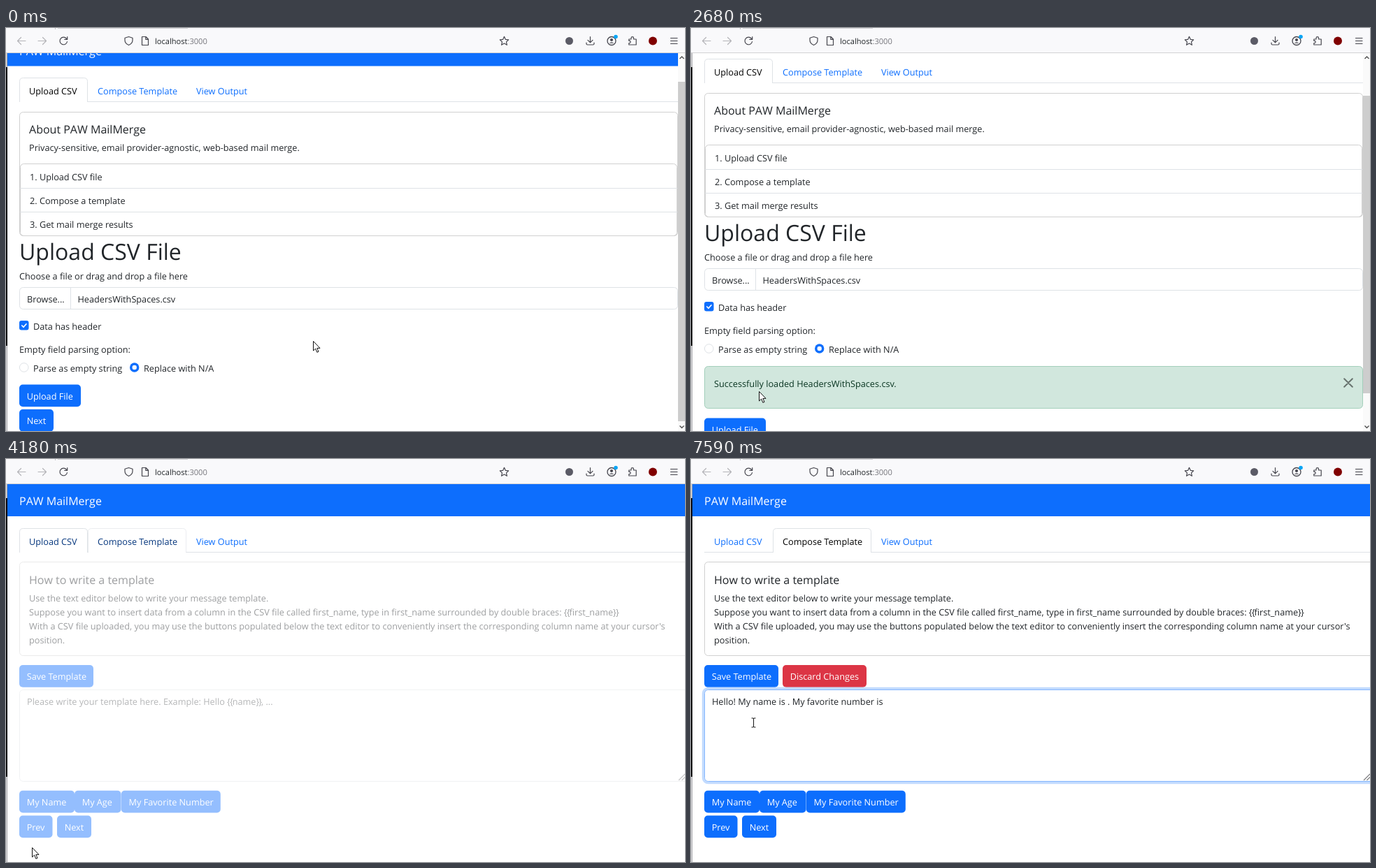
An HTML page for the animation above (8000 ms loop, 971 by 577 pixels).

```html
<!DOCTYPE html>
<html lang="en">
<head>
<meta charset="utf-8">
<title>Mail merge demo</title>
<style>
  html, body { margin: 0; width: 100%; height: 100%; overflow: hidden; background: #fff; }
  svg { display: block; width: 971px; height: 577px; }
  text { font: 12.7px "Open Sans", "Noto Sans", sans-serif; fill: #212529; text-rendering: geometricPrecision; white-space: pre; }
  .title { font-size: 16px; font-kerning: none; }
  .head { font-size: 32px; }
  .url { font-size: 11.1px; }
  .brace { letter-spacing: -.08em; }
  .light { fill: #fff; }
  .link { fill: #0d6efd; }
  .black { fill: #000; }
  .hint { fill: #595c5f; }
  .alert { fill: #0a3622; }
  .line { fill: none; stroke: #dee2e6; }
  .card { fill: none; stroke: #d0d0d0; }
  .icon { fill: none; stroke: #45454d; stroke-width: 1.2; stroke-linejoin: round; stroke-linecap: round; }
  .dim { stroke: #b4b4b8; }
</style>
</head>
<body>
<svg id="stage" viewBox="0 0 971 577" xmlns="http://www.w3.org/2000/svg"></svg>
<script>
const LOOP = 8000;
const BLUE = '#0d6efd', HOVER = '#0b5ed7';

const text = (x, y, s, cls = '', id = '') => `<text x="${x}" y="${y}" class="${cls}" id="${id}">${s}</text>`;
const rect = (x, y, w, h, fill, r = 0, more = '') =>
  `<rect x="${x}" y="${y}" width="${w}" height="${h}" rx="${r}" fill="${fill}" ${more}/>`;
const frame = (x, y, w, h, cls = 'line') => `<rect x="${x}" y="${y}" width="${w}" height="${h}" rx="5" class="${cls}"/>`;
const path = (d, cls = 'line', more = '') => `<path d="${d}" class="${cls}" ${more}/>`;
const circle = (x, y, r, fill, more = '') => `<circle cx="${x}" cy="${y}" r="${r}" fill="${fill}" ${more}/>`;
const group = (id, body, more = '') => `<g id="${id}" ${more}>${body}</g>`;
const braces = s => s.replace(/\{\{|\}\}/g, '<tspan class="brace">$&</tspan>');
const button = (x, y, w, label, id = '', fill = BLUE) =>
  rect(x, y, w, 31.7, fill, 5, `id="${id}"`) + text(x + 10.7, y + 21.3, label, 'light');
const tab = (x, y, w, id = '') =>
  path(`M${x} ${y + 34.5}V${y + 5}q0 -5 5 -5h${w - 10}q5 0 5 5v29.5`, 'line', `id="${id}" style="fill:#fff"`);

function browser() {
  const icons = [
    ['M28 18.5H17M21.5 13.5L16.5 18.5L21.5 23.5', 'icon dim'],
    ['M46 18.5H57M52.5 13.5L57.5 18.5L52.5 23.5', 'icon dim'],
    ['M86.5 15.2A5.3 5.3 0 1 0 87.5 19.5M87.7 12.5V16.3H83.8'],
    ['M175.5 12.5L181 14.3V17.5Q181 22 175.5 24.5Q170 22 170 17.5V14.3Z'],
    ['M194.5 12.5H200L203.5 16V24.5H194.5ZM199.8 12.7V16.3H203.3'],
    ['M712.5 12.3L714.4 16.4L718.7 16.9L715.5 19.9L716.4 24.3L712.5 22.1L708.6 24.3L709.5 19.9L706.3 16.9L710.6 16.4Z'],
    ['M835.5 12.5V20.5M832 17.3L835.5 20.8L839 17.3M830 21V22.5Q830 24 831.5 24H839.5Q841 24 841 22.5V21'],
    ['M890.8 16H894V14.5A1.7 1.7 0 0 1 897.6 14.5V16H901.2V24H890.8V21.5H892A1.7 1.7 0 0 0 892 18.3H890.8Z'],
    ['M950.5 14.5H960M950.5 18.5H960M950.5 22.5H960']
  ];
  return rect(0, 0, 971, 36, '#f9f9fb') +
    rect(74, 0, 186, 1, '#d2d2d6') + rect(70, 0, 1, 2, '#c4c4c8') +
    rect(0, 35, 971, 1, '#d2d2d4') +
    icons.map(([d, cls = 'icon']) => path(d, cls)).join('') +
    text(213, 23, 'localhost<tspan fill="#77777d">:3000</tspan>', 'url') +
    circle(805.5, 18.5, 5.5, '#5b5b66') +
    circle(866, 18.5, 6, 'none', 'stroke="#45454d" stroke-width="1.3"') +
    circle(866, 17, 2.1, '#45454d') + path('M862.6 21.8Q866 18.8 869.4 21.8Z', '', 'fill="#45454d"') +
    circle(872, 12.5, 2.8, '#0aa5f5') +
    circle(925, 18.5, 6, '#800000');
}

function desktopEdge() {
  return rect(0, 0, 2, 577, '#e4e4e6') + rect(1, 36, 1, 541, '#a4a4a7') +
    rect(0, 56, 2, 399, '#0b0b0d');
}

function uploadPage() {
  const steps = ['1. Upload CSV file', '2. Compose a template', '3. Get mail merge results'];
  return rect(2, 8, 959, 46.5, BLUE) + text(19, 39, 'PAW MailMerge', 'light title') +
    path('M19 105.5H961') + tab(19.5, 71.5, 97) +
    text(33, 95, 'Upload CSV', 'black') + text(131, 95, 'Compose Template', 'link') + text(272, 95, 'View Output', 'link') +
    frame(19.5, 120.5, 941, 177, 'card') +
    text(33, 151, 'About PAW MailMerge', 'title') +
    text(33, 176, 'Privacy-sensitive, email provider-agnostic, web-based mail merge.') +
    frame(20.5, 194.5, 939, 103, 'card') + path('M20 229.5H960M20 263.5H960') +
    steps.map((s, i) => text(34, 218 + 34.2 * i, s)).join('') +
    text(19, 332, 'Upload CSV File', 'head') +
    text(19, 360, 'Choose a file or drag and drop a file here') +
    frame(19.5, 371.5, 941, 31) + path('M92.5 372V402') +
    text(30, 392.5, 'Browse...') + text(102.5, 392.5, 'HeadersWithSpaces.csv') +
    rect(19, 419, 13.5, 13.5, BLUE, 3) +
    path('M22.8 426L25 428.2L29 423.8', '', 'fill="none" stroke="#fff" stroke-width="1.7" stroke-linecap="round"') +
    text(39, 431.5, 'Data has header') +
    text(19, 465, 'Empty field parsing option:') +
    circle(25.7, 486, 6.3, '#fff', 'stroke="#dee2e6"') + text(39, 491.5, 'Parse as empty string') +
    circle(183.7, 486, 6.7, BLUE) + circle(183.7, 486, 3.2, '#fff') + text(197, 491.5, 'Replace with N/A') +
    group('alert', frame(19.5, 511.5, 941, 60, 'box') +
      text(33, 541, 'Successfully loaded HeadersWithSpaces.csv.', 'alert') +
      path('M934.2 529.2L945.8 540.8M945.8 529.2L934.2 540.8', '', 'stroke="#68736e" stroke-width="2" stroke-linecap="round"')) +
    group('actions', button(19, 510.5, 88, 'Upload File', 'upload') + button(19, 546, 49, 'Next', 'next'));
}

function scrollbar() {
  return rect(961, 36, 10, 541, '#fafafa') + rect(961, 0, 10, 0, '#cdcdcd', 0, 'id="thumb"') +
    path('M963.5 44L966.5 41L969.5 44M963.5 569.5L966.5 572.5L969.5 569.5', '', 'fill="none" stroke="#505050" stroke-width="1.4"');
}

function composePage() {
  const help = [
    'Use the text editor below to write your message template.',
    'Suppose you want to insert data from a column in the CSV file called first_name, type in first_name surrounded by double braces: {{first_name}}',
    'With a CSV file uploaded, you may use the buttons populated below the text editor to conveniently insert the corresponding column name at your cursor\'s',
    'position.'
  ];
  return rect(2, 36, 969, 541, '#fff') + rect(2, 36, 969, 46, BLUE) +
    text(19, 66, 'PAW MailMerge', 'light title') +
    path('M19 133.5H971') + tab(19.5, 99.5, 97, 'oldTab') + tab(117.5, 99.5, 140, 'newTab') +
    text(33, 122.5, 'Upload CSV', '', 'oldLabel') + text(131, 122.5, 'Compose Template', '', 'newLabel') +
    text(272, 122.5, 'View Output', 'link') +
    group('editor', frame(19.5, 147.5, 970, 134, 'card') +
      text(33, 178.5, 'How to write a template', 'title') +
      help.map((s, i) => text(33, 204 + 20 * i, braces(s))).join('') +
      button(19, 295, 106, 'Save Template') +
      group('discard', button(131, 295, 120, 'Discard Changes', '', '#dc3545')) +
      group('ring', rect(17.5, 328.5, 980, 135, 'none', 7, 'stroke="#c2dbfe" stroke-width="3.4"')) +
      rect(19.5, 330.5, 976, 131, '#fff', 5, 'id="area"') +
      path('M962 460L971 451M966.5 460L971 455.5', '', 'stroke="#77777a" stroke-width="1.1"') +
      text(30, 352, braces('Please write your template here. Example: Hello {{name}}, ...'), 'hint', 'hint') +
      text(30, 352, 'Hello! My name is . My favorite number is', '', 'typed') +
      rect(30, 337, 1, 18, '#212529', 0, 'id="caret"') +
      button(19, 474.7, 79, 'My Name') + button(98, 474.7, 66.5, 'My Age') + button(164.8, 474.7, 142, 'My Favorite Number') +
      button(19, 510.5, 47.5, 'Prev') + button(73, 510.5, 49, 'Next'));
}

function pointers() {
  const fill = 'fill="#fff" stroke="#111" stroke-linejoin="round"';
  return group('arrow', path('M.5 .5V14L3.6 11.1L5.8 16.3L8 15.4L5.8 10.4H10Z', '', fill)) +
    group('hand', path('M-1.4 2a1.4 1.4 0 0 1 2.8 0V6.3L5.7 7.2Q7.8 7.8 7.7 9.6V12Q7.6 14.5 6.5 16V18.5H-.8V17Q-3 14.5 -5 11Q-5.4 9.2 -3.8 9Q-2.6 9.2 -1.4 11Z', '', fill)) +
    group('beam', path('M-3 -6.5H-1L0 -5.8L1 -6.5H3M-3 6.5H-1L0 5.8L1 6.5H3M0 -5.8V5.8', '', 'fill="none" stroke="#222" stroke-width="1.1"'));
}

const stage = document.getElementById('stage');
stage.innerHTML = '<clipPath id="view"><rect x="2" y="36" width="969" height="541"/></clipPath>' +
  rect(0, 0, 971, 577, '#fff') + desktopEdge() + browser() +
  `<g clip-path="url(#view)">${group('uploadView', group('page', uploadPage()) + scrollbar())}${group('composeView', composePage())}</g>` +
  pointers();

const el = {};
stage.querySelectorAll('[id]').forEach(n => { if (n.id) el[n.id] = n; });
const set = (id, attrs) => { for (const k in attrs) el[id].setAttribute(k, attrs[k]); };
const show = (id, on) => set(id, { display: on ? 'inline' : 'none' });
stage.querySelector('.box').setAttribute('style', 'fill:#d1e7dd;stroke:#a3cfbb');

// Each track lists [start, ...values]; values hold until the next start.
const pointerTrack = [
  [0, 'arrow', 439, 448], [500, 'arrow', 436, 449], [710, 'arrow', 200, 505], [840, 'arrow', 105, 521],
  [1000, 'hand', 97, 520], [1990, 'arrow', 97, 520], [2950, 'hand', 97, 520], [3210, 'hand', 60, 547],
  [3360, 'hand', 39, 558], [3640, 'hand', 38, 556], [4180, 'arrow', 37, 556], [4730, 'arrow', 47, 519],
  [4890, 'beam', 74, 383], [5300, 'beam', 87, 379], [5430, 'beam', 89, 378], [5590, 'beam', 89.5, 377.5]
];
const scrollTrack = [[0, 0, 77, 486], [1990, 0, 73, 427], [2680, 27, 97, 426], [2810, 75, 137, 426]];
const uploadTrack = [[0, BLUE], [1000, '#0c66ea'], [1130, HOVER], [1990, BLUE], [2950, HOVER], [3360, '#0c66ea'], [3490, BLUE]];
const nextTrack = [[0, BLUE], [3360, '#0c66ea'], [3490, HOVER]];
const at = (track, t) => track.filter(k => k[0] <= t).pop().slice(1);

function draw(t) {
  const [kind, x, y] = at(pointerTrack, t);
  for (const id of ['arrow', 'hand', 'beam']) show(id, id === kind);
  set(kind, { transform: `translate(${x} ${y})` });

  const composing = t >= 4180, loaded = t >= 1990;
  show('uploadView', !composing);
  show('composeView', composing);

  const [scroll, top, height] = at(scrollTrack, t);
  set('page', { transform: `translate(0 ${-scroll})` });
  set('thumb', { y: top, height });
  show('alert', loaded);
  set('actions', { transform: `translate(0 ${loaded ? 75 : 0})` });
  set('upload', { fill: at(uploadTrack, t)[0] });
  set('next', { fill: at(nextTrack, t)[0] });

  const fading = t < 4300, focused = t >= 5990, typed = t >= 7050;
  set('editor', { opacity: fading ? 0.44 : 1 });
  show('oldTab', fading);
  set('newTab', { 'stroke-opacity': fading ? 0.6 : 1 });
  el.oldLabel.style.fill = fading ? '#06377e' : BLUE;
  el.newLabel.style.fill = fading ? '#06377e' : '#000';
  show('ring', focused);
  set('area', { stroke: focused ? '#86b7fe' : '#dee2e6' });
  show('discard', typed);
  show('typed', typed);
  show('hint', !typed);
  show('caret', (focused && t < 6520) || (typed && t < 7590));
  set('caret', { x: typed ? 274 : 30 });
}

const start = performance.now();
function tick() {
  draw((performance.now() - start) % LOOP);
  requestAnimationFrame(tick);
}
tick();
</script>
</body>
</html>
```
